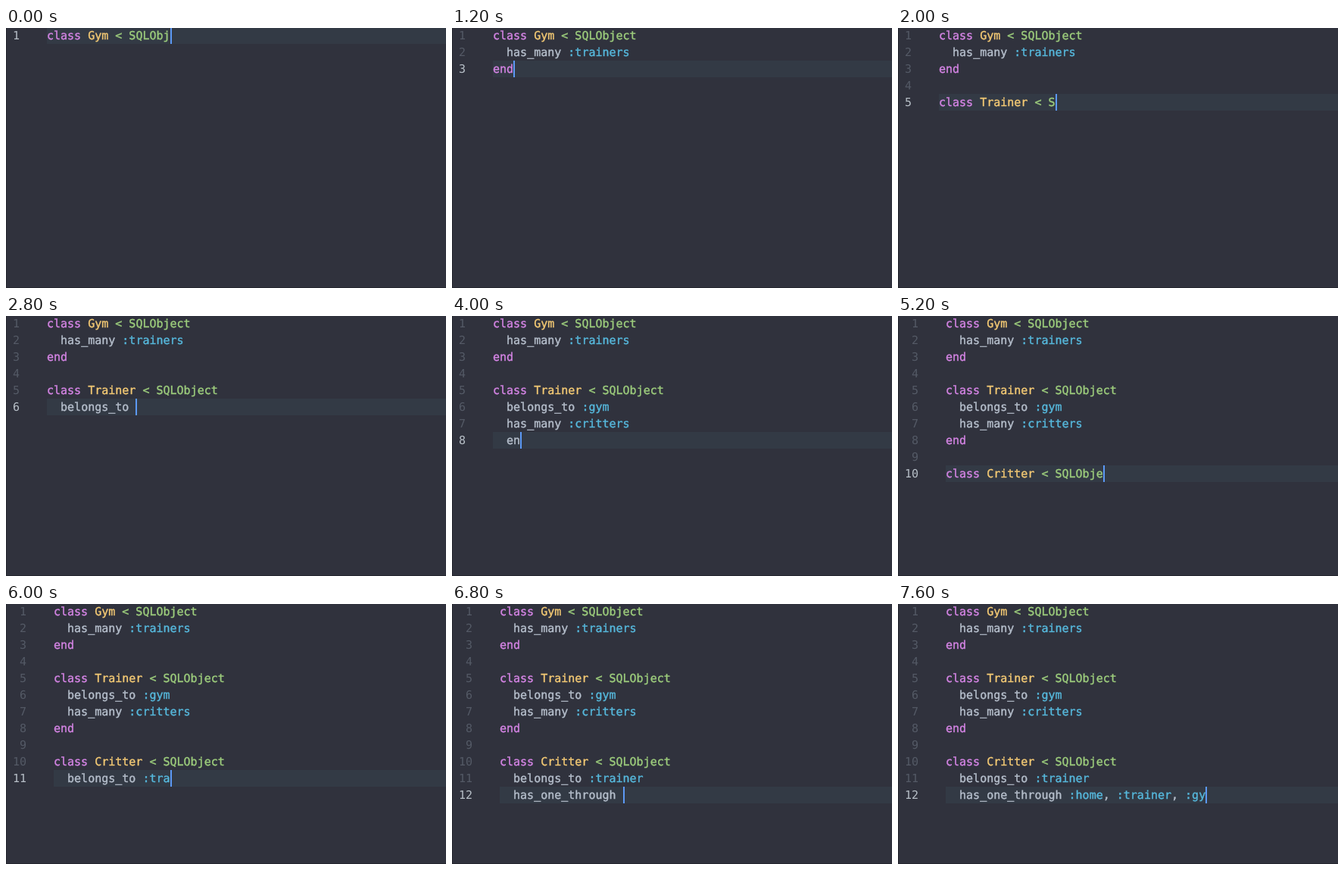
These frames come from a looping animation (581x343 px, 8000 ms). An HTML page:

```html
<!DOCTYPE html>
<html lang="en">
<head>
<meta charset="utf-8">
<style>
  html, body { margin: 0; width: 100%; height: 100%; overflow: hidden; background: #30323d; }
  #editor {
    position: absolute; inset: 0; overflow: hidden;
    box-sizing: border-box; border: solid #24262e; border-width: 0 0 1px 1px;
    font: 15px/22px "DejaVu Sans Mono", monospace;
    text-rendering: geometricPrecision;
    -webkit-text-stroke: 0.4px;
    color: #b6bfcc;
  }
  .row { position: absolute; left: 8px; right: 0; height: 22px; white-space: pre; }
  .number { position: absolute; left: 0; text-align: right; color: #545a66; -webkit-text-stroke: 0; }
  .code { position: absolute; right: 0; height: 22px; }
  .active .number { color: #b8c0c8; }
  .active .code { background: #333a45; }
  .active .code::after { content: ""; position: absolute; top: 0; width: 2px; height: 22px; background: #5c99f5; }
  .keyword { color: #d484e4; }
  .name { color: #f3c974; }
  .parent { color: #9ccc7c; }
  .symbol { color: #56b8dc; }
</style>
</head>
<body>
<div id="editor"></div>
<script>
const STEP = 400, CHAR = 9, LINE = 22;

// Each "|" ends the burst of typing shown in one step.
const bursts = `class Gym < SQLObj|ect
  has_|many :train|ers
end|

class T|rainer < S|QLObject
  b|elongs_to |:gym
  has|_many :crit|ters
en|d

class C|ritter < |SQLObje|ct
  belon|gs_to :tra|iner
  has_on|e_through |:home, :|trainer, :gy`.split("|");

const TOKENS = /(?<keyword>^(?:class|end)\b)|(?<name>(?<=^class )\w+)|(?<parent><.*)|(?<symbol>:\w*)/g;
const editor = document.getElementById("editor");

function element(className, text = "") {
  const node = document.createElement("span");
  node.className = className;
  node.textContent = text;
  return node;
}

function highlight(line, code) {
  let end = 0;
  for (const match of line.matchAll(TOKENS)) {
    const kind = Object.keys(match.groups).find(key => match.groups[key]);
    code.append(line.slice(end, match.index), element(kind, match[0]));
    end = match.index + match[0].length;
  }
  code.append(line.slice(end));
}

function render(step) {
  // The editor dedents a closing "end" only once it is complete.
  const text = bursts.slice(0, step + 1).join("").replace(/\nen$/, "\n  en");
  const lines = text.split("\n");
  const gutter = String(lines.length).length * CHAR;

  editor.replaceChildren(...lines.map((line, i) => {
    const row = element(i === lines.length - 1 ? "row active" : "row");
    const number = element("number", i + 1);
    const code = element("code");
    row.style.top = i * LINE - 1 + "px";
    number.style.width = gutter + "px";
    code.style.left = gutter + 4 * CHAR + "px";
    highlight(line, code);
    row.append(number, code);
    return row;
  }));
}

let shown = -1;
function frame() {
  const step = Math.floor(performance.now() / STEP) % bursts.length;
  if (step !== shown) render(shown = step);
  requestAnimationFrame(frame);
}
frame();
</script>
</body>
</html>
```
